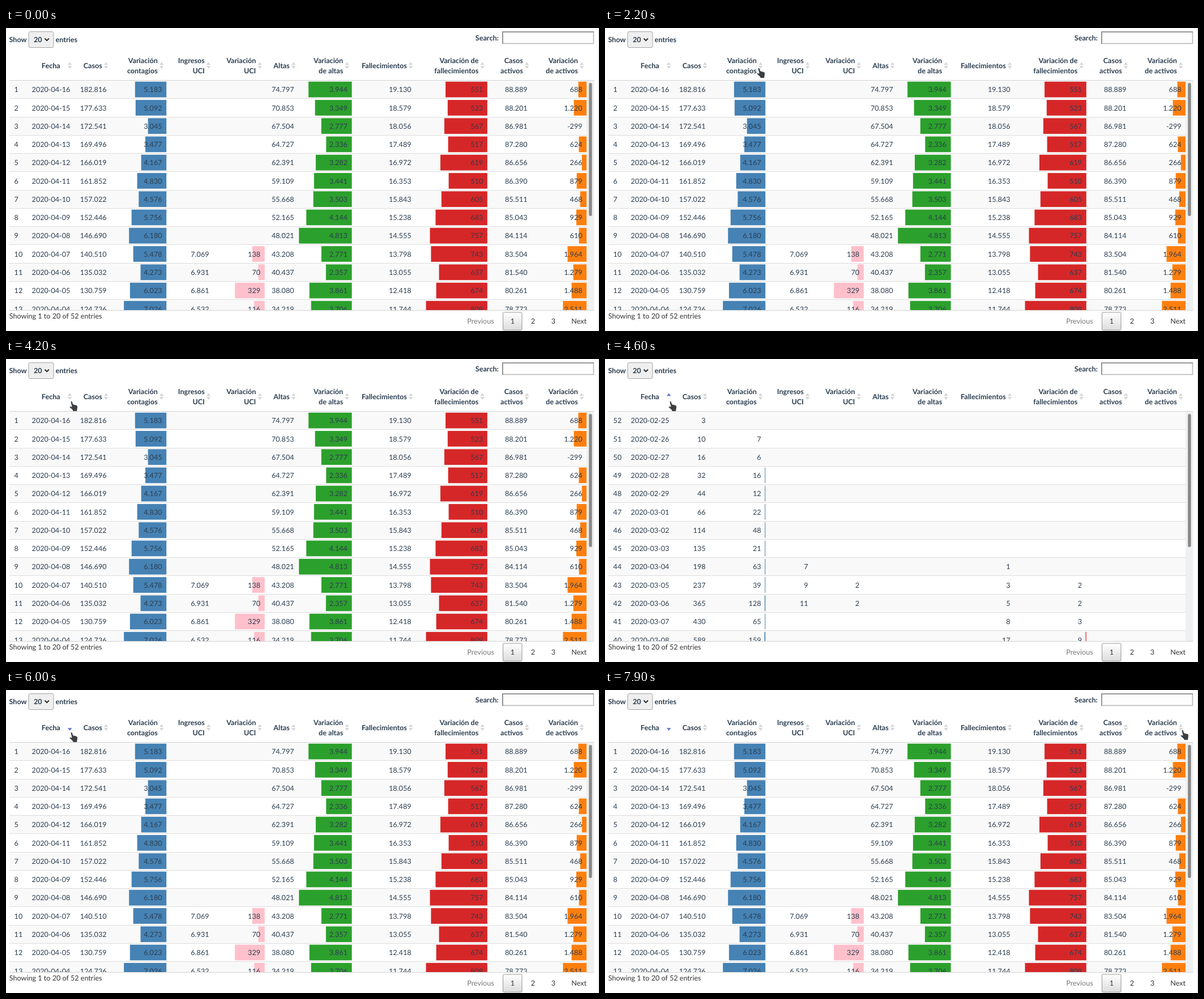
An HTML page that plays this animation: 1047 px wide and 535 px high, repeating every 8000 ms.

```html
<!DOCTYPE html>
<html lang="es">
<head>
<meta charset="utf-8">
<title>Tabla de casos</title>
<style>
  html, body { margin: 0; width: 100%; height: 100%; overflow: hidden; background: #fff; }
  svg { display: block; width: 1047px; height: 535px; font: 12.6px Lato, sans-serif; fill: #2c3e50; }
  text { text-rendering: geometricPrecision; }
  .bold { font-weight: 700; }
  .page { fill: #333; }
</style>
</head>
<body>
<svg id="stage" viewBox="0 0 1047 535">
  <defs>
    <clipPath id="bodyClip"><rect y="93" width="1047" height="405"/></clipPath>
    <linearGradient id="button" x2="0" y2="1">
      <stop stop-color="#fff"/><stop offset="1" stop-color="#dcdcdc"/>
    </linearGradient>
  </defs>
</svg>
<script>
const LOOP = 8000, STEP = 100, SORT_UP = 4600, SORT_DOWN = 6000;
const TOP = 93, PITCH = 32.27, ROWS = 13;
const stage = document.getElementById('stage');

function add(parent, tag, attrs = {}, content) {
  const el = document.createElementNS('http://www.w3.org/2000/svg', tag);
  for (const key in attrs) el.setAttribute(key, attrs[key]);
  if (content !== undefined) el.textContent = content;
  parent.append(el);
  return el;
}
const rect = (parent, x, y, width, height, fill, more) =>
  add(parent, 'rect', { x, y, width, height, fill, ...more });
const text = (parent, x, y, content, anchor = 'start', more) =>
  add(parent, 'text', { x, y, 'text-anchor': anchor, ...more }, content);
const show = (el, on) => el.setAttribute('visibility', on ? 'visible' : 'hidden');

// A series yields [total, daily change] for each row; rows before `skip` stay empty.
const total = (key, head, right) => ({ head, right, value: row => row[key]?.[0] });
const change = (key, head, right, color, scale, zero = 0) =>
  ({ head, right, color, scale, zero, value: row => row[key]?.[1] });

const columns = [
  { head: 'Fecha', right: 113 },
  total('cases', 'Casos', 177),
  change('cases', 'Variación/contagios', 275, '#4682b4', .01068),
  total('icu', 'Ingresos/UCI', 358),
  change('icu', 'Variación/UCI', 448.5, '#ffc0cb', .1597),
  total('cured', 'Altas', 508),
  change('cured', 'Variación/de altas', 602.4, '#2ca02c', .0194),
  total('dead', 'Fallecimientos', 715),
  change('dead', 'Variación de/fallecimientos', 841.6, '#d62728', .1338),
  total('active', 'Casos/activos', 920),
  change('active', 'Variación/de activos', 1017, '#ff7f0e', .0149, -299),
];

function countDown(start, changes, skip = 0) {
  const rows = Array(skip).fill(null);
  for (const step of changes.split(' ').map(Number)) {
    rows.push([start, step]);
    start -= step;
  }
  return rows;
}
function countUp(changes, skip = 0) {
  const rows = Array(skip).fill(null);
  let sum = 0;
  for (const step of changes.split(' ').map(Number)) {
    rows.push([sum + step, sum ? step : null]);
    sum += step;
  }
  return rows;
}

const newest = {
  cases: countDown(182816, '5183 5092 3045 3477 4167 4830 4576 5756 6180 5478 4273 6023 7026'),
  cured: countDown(74797, '3944 3349 2777 2336 3282 3441 3503 4144 4813 2771 2357 3861 3706'),
  dead: countDown(19130, '551 523 567 517 619 510 605 683 757 743 637 674 809'),
  icu: countDown(7069, '138 70 329 116', 9),
};
newest.active = newest.cases.map((pair, i) =>
  pair.map((n, k) => n - newest.cured[i][k] - newest.dead[i][k]));
const oldest = {
  cases: countUp('3 7 6 16 12 22 48 21 63 39 128 65 159'),
  icu: countUp('7 2 2', 8),
  dead: countUp('1 2 2 3 9', 8),
};

const format = n => String(n).replace(/\B(?=(\d{3})+$)/g, '.');
const dateOf = n => new Date(Date.UTC(2020, 3, 17 - n)).toISOString().slice(0, 10);

function drawRows(series, numberAt) {
  const group = add(bodyLayer, 'g');
  for (let i = 0; i < ROWS; i++) {
    const top = TOP + i * PITCH, base = top + 20.3;
    const row = {};
    for (const key in series) row[key] = series[key][i];
    text(group, 14.6, base, numberAt(i));
    text(group, 79.5, base, dateOf(numberAt(i)), 'middle');
    for (const { value, right, color, scale, zero } of columns.slice(1)) {
      const n = value(row);
      if (n == null) continue;
      const width = (n - zero) * scale;
      if (color && width > .1 && n > 7) {
        const w = Math.max(width, 1);
        rect(group, right + 8.2 - w, top + 1.7, w, 27.7, color);
      }
      text(group, right + .5, base, format(n), 'end');
    }
  }
  return group;
}

// Controls above and below the table
const bold = { class: 'bold' }, page = { class: 'page' };
text(stage, 5.5, 25.2, 'Show', 'start', bold);
rect(stage, 40, 6.5, 44, 28, '#efefef', { rx: 3, stroke: '#a3a3a3' });
text(stage, 49, 25.2, '20', 'start', bold);
add(stage, 'path', { d: 'M68.5 18.5l3.7 3.7 3.7-3.7', fill: 'none', stroke: '#222', 'stroke-width': 1.8 });
text(stage, 87.5, 25.2, 'entries', 'start', bold);
text(stage, 869.8, 21.8, 'Search:', 'end', bold);
rect(stage, 876.8, 6.8, 160.6, 20.6, '#fdfdfd', { stroke: '#b9b9b9', 'stroke-width': 1.6 });
add(stage, 'path', { d: 'M876.8 28V6.8H1038', fill: 'none', stroke: '#858585', 'stroke-width': 1.6 });
text(stage, 5.8, 512.5, 'Showing 1 to 20 of 52 entries', 'start', page);
text(stage, 838, 522.4, 'Previous', 'middle', { fill: '#777' });
rect(stage, 877.5, 502, 33.5, 31.5, 'url(#button)', { rx: 1.7, stroke: '#979797' });
for (let n = 1; n <= 3; n++) text(stage, 858.3 + 36 * n, 522.4, n, 'middle', page);
text(stage, 1011.7, 522.4, 'Next', 'middle', page);
rect(stage, 1045, 0, 2, 535, '#ececec');

// Header
const triangle = (x, y, dir, fill) =>
  add(stage, 'path', { d: `M${x - 3.7} ${y}h7.4l-3.7 ${5 * dir}z`, fill });
const sortIcon = (x, fill) => [triangle(x, 65.2, -1, fill), triangle(x, 67, 1, fill)];
const plainIcons = columns.map(({ head, right }, i) => {
  const lines = head.split('/');
  lines.forEach((line, k) => {
    const y = 70.7 + 17.6 * (k - (lines.length - 1) / 2);
    if (i) text(stage, right - 7.2, y, line, 'end', bold);
    else text(stage, 79.3, y, line, 'middle', bold);
  });
  return sortIcon(right - .4, '#d6d6d6');
});
const [upIcon, downIcon] = sortIcon(112.7, '#6578d2');

// Body
const bodyLayer = add(stage, 'g', { 'clip-path': 'url(#bodyClip)' });
const stripes = Array.from({ length: ROWS }, (_, i) => {
  const y = Math.round(TOP + i * PITCH);
  const stripe = rect(bodyLayer, 6, y, 1019, 32.5, '#fff');
  if (i) rect(bodyLayer, 6, y - 1, 1019, 1, '#ddd');
  return stripe;
});
const newestRows = drawRows(newest, i => 1 + i);
const oldestRows = drawRows(oldest, i => 52 - i);
rect(stage, 1025, 93, 13.5, 405, '#eff0f1');
rect(stage, 1029.2, 97, 5.4, 235, '#888', { rx: 2.7 });
for (const y of [92, 498]) rect(stage, 6, y, 1032.5, 1, '#d2d2d2');

const hand = add(stage, 'path', {
  d: 'M3 2.4Q4.4.6 6 2.4L7.6 7 13.4 8.4Q15.6 9.2 15.4 11.8L14.4 19.4H7.2L6.6 17 1.6 12.6Q.6 11 2.2 10.4L5.2 11.2Z',
  fill: '#3b3e42', stroke: '#fff', 'stroke-width': .7, 'stroke-linejoin': 'round',
});

// Pointer key points: time, x, y
const path = [
  [700, 66, 0], [1100, 121, 70], [1500, 172, 162], [1900, 251, 77], [2200, 267, 69],
  [3500, 267, 69], [3600, 109, 75], [3900, 104, 73], [4200, 111, 73],
  [6400, 111, 73], [6600, 317, 90], [7300, 860, 93], [7600, 1018, 77], [7900, 1015, 69],
];

function pointerAt(t) {
  const i = path.findIndex(p => p[0] > t);
  if (i === 0) return null;
  if (i < 0) return path[path.length - 1].slice(1);
  const [t0, x0, y0] = path[i - 1], [t1, x1, y1] = path[i];
  const k = (t - t0) / (t1 - t0);
  return [x0 + (x1 - x0) * k, y0 + (y1 - y0) * k];
}

function draw(time) {
  const t = Math.floor(time % LOOP / STEP) * STEP;
  const up = t >= SORT_UP && t < SORT_DOWN;
  show(oldestRows, up);
  show(newestRows, !up);
  show(upIcon, up);
  show(downIcon, t >= SORT_DOWN);
  plainIcons[0].forEach(el => show(el, t < SORT_UP));

  const at = pointerAt(t);
  show(hand, at);
  if (at) hand.setAttribute('transform', `translate(${at})`);
  const hovered = at ? Math.floor((at[1] + 1 - TOP) / PITCH) : -1;
  stripes.forEach((el, i) =>
    el.setAttribute('fill', i === hovered ? '#f6f6f6' : i % 2 ? '#fff' : '#f9f9f9'));
}

const start = performance.now();
function tick() {
  draw(performance.now() - start);
  requestAnimationFrame(tick);
}
tick();
</script>
</body>
</html>
```
